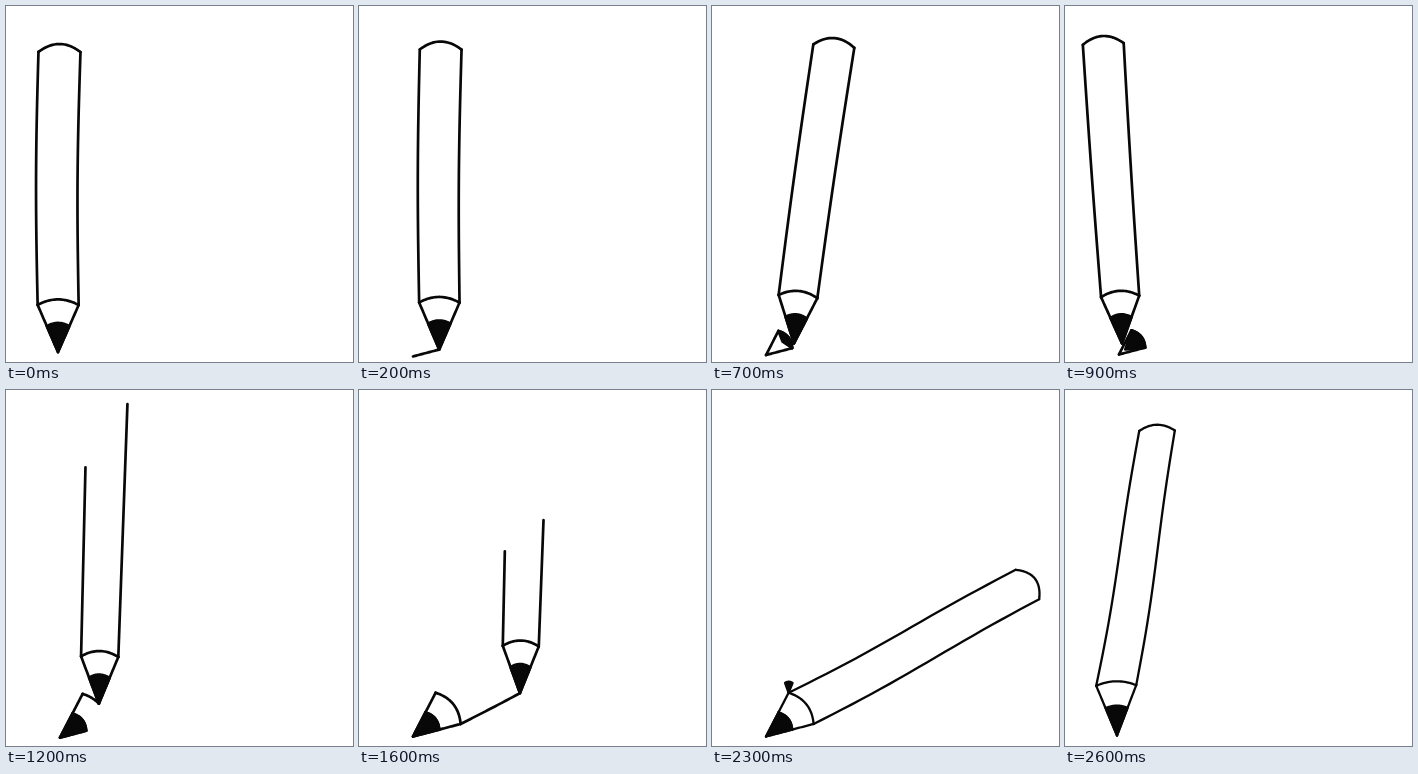
Recreate the animation shown at these times as an HTML page with a canvas. Size 347 by 356 pixels, loop 2.7 s.

```html
<!DOCTYPE html>
<html lang="en">
<head>
<meta charset="utf-8">
<title>Pencil draws pencil</title>
<style>
html, body { margin: 0; width: 100%; height: 100%; overflow: hidden; background: #fff; }
canvas { display: block; }
</style>
</head>
<body>
<canvas id="stage" width="347" height="356"></canvas>
<script>
const ctx = document.getElementById('stage').getContext('2d');
const STEP = 100, STEPS = 27, SPIN = 23, LEAD = 0.55;

// Vector and easing helpers; angles are degrees clockwise from straight up
const clamp = v => Math.max(0, Math.min(1, v));
const ramp = (n, from, to) => clamp((n - from) / (to - from));
const lerp = (a, b, u) => a.map((v, i) => v + (b[i] - v) * u);
const polar = ([x, y], deg, r) => {
  const a = deg * Math.PI / 180;
  return [x + r * Math.sin(a), y - r * Math.cos(a)];
};

// Curves are functions from 0..1 to a point
const line = (a, b) => u => lerp(a, b, u);
const reverse = curve => u => curve(1 - u);

// A chord pushed to its right by offset(u) pixels
function bent(a, b, offset) {
  const dx = b[0] - a[0], dy = b[1] - a[1], len = Math.hypot(dx, dy);
  return u => {
    const [x, y] = lerp(a, b, u), k = offset(u) / len;
    return [x - dy * k, y + dx * k];
  };
}
const arc = (a, b, bulge) => bent(a, b, u => -4 * bulge * u * (1 - u));
const side = (a, b, bow, wave) =>
  bent(a, b, u => bow * Math.sin(Math.PI * u) + wave * Math.sin(2 * Math.PI * u));

const sample = (curve, from = 0, to = 1) =>
  Array.from({ length: 25 }, (_, i) => curve(from + (to - from) * i / 24));

function path(points) {
  ctx.beginPath();
  points.forEach(p => ctx.lineTo(...p));
}

function trace(curve, from = 0, to = 1) {
  if (to - from < 0.001) return;
  path(sample(curve, from, to));
  ctx.stroke();
}

function blob(points) {
  path(points);
  ctx.closePath();
  ctx.fill();
  ctx.stroke();
}

// All outlines of a pencil, from its tip, the angles of cone and body, and its sizes
function pencil({ tip, cone, body, coneLen, bodyLen, half, capHalf, bulge, bow, wave }) {
  const neck = polar(tip, cone, coneLen), end = polar(neck, body, bodyLen);
  const left = polar(neck, cone - 90, half), right = polar(neck, cone + 90, half);
  const capL = polar(end, cone - 90, capHalf), capR = polar(end, cone + 90, capHalf);
  const leadL = lerp(tip, left, LEAD), leadR = lerp(tip, right, LEAD);
  return {
    tip, left, right, leadL, leadR,
    leadArc: arc(leadL, leadR, bulge * 0.4),
    coneArc: arc(left, right, bulge * 0.7),
    cap: arc(capL, capR, bulge),
    sideL: side(left, capL, bow, wave),
    sideR: side(right, capR, bow, wave)
  };
}

// The drawn pencil lies on its side, then swings upright
function drawnPencil(n) {
  const swing = Math.max(0, n - SPIN) / 3;
  const body = 61.3 - 52.2 * swing ** 1.25;
  const drift = 4.5 * (1 - ramp(n, 0, 16));
  return pencil({
    tip: [54 - 2 * swing, 346.5 - swing + drift], cone: body - 10, body,
    coneLen: 45 + 5 * swing, bodyLen: 258, half: 20, capHalf: 18.8 - swing,
    bulge: 9.5 - 3.5 * swing, bow: 1, wave: 1
  });
}

// The drawing pencil stands almost upright and leans while it shades
function drawingPencil(n, tip) {
  const tilt = n < 5 ? 0.3 : n <= 10 ? (tip[0] - 65) * 0.48 : 1.7;
  const slim = ramp(n, 0, 16);
  return pencil({
    tip, cone: tilt * 0.6, body: tilt, coneLen: 47, bodyLen: 253,
    half: 20.5 - 2.5 * slim, capHalf: 21 - slim,
    bulge: 8, bow: -2 * (1 - ramp(n, 0, 12)), wave: 0
  });
}

// Pen strokes in order: first step, last step, curve
const strokesOf = p => [
  [1, 2, line(p.tip, p.leadR)],
  [2, 3, reverse(p.leadArc)],
  [3, 4, line(p.leadL, p.tip)],
  [10, 11, line(p.leadL, p.left)],
  [11.2, 13, p.coneArc],
  [13, 14, line(p.right, p.leadR)],
  [15.3, 18, p.sideR],
  [18, 19, reverse(p.cap)],
  [19, 23, reverse(p.sideL)]
];

function penTip(strokes, n) {
  if (n === 0) return [52, 346];
  if (n >= 5 && n <= 10) {
    const sway = Math.sin((n - 5) * Math.PI / 3);
    return [69.5 + 14.4 * sway, 327 + 12 * Math.abs(sway)];
  }
  const [from, to, curve] = strokes.filter(s => Math.floor(s[0]) <= n).pop();
  return curve(ramp(n, from, to));
}

function drawLead(p, scale = 1) {
  blob([p.tip, ...sample(p.leadArc)].map(q => lerp(p.tip, q, scale)));
}

function drawSketch(p, strokes, n) {
  strokes.forEach(([from, to, curve]) => trace(curve, 0, ramp(n, from, to)));
  const shade = ramp(n, 5, 10) ** 1.5;
  if (n >= 5) blob([...sample(p.leadArc), lerp(p.leadArc(0.5), p.tip, shade)]);
}

// Each line used up on the new pencil is missing from the old one
function drawRest(p, n) {
  trace(p.cap, ramp(n, 9, 11), 1);
  trace(p.sideL, 0, 1 - ramp(n, 9.3, 20));
  trace(p.sideR, 0, 1 - ramp(n, 12, 20));
  trace(p.coneArc, 0, 1 - ramp(n, 20, 21));
  const cone = 1 - ramp(n, 20, 22);
  trace(line(p.tip, p.left), 0, cone);
  trace(line(p.tip, p.right), 0, cone);
  drawLead(p, 1 - 0.62 * ramp(n, 21, 23));
}

function draw(n) {
  ctx.fillStyle = '#fff';
  ctx.fillRect(0, 0, 347, 356);
  ctx.fillStyle = ctx.strokeStyle = '#080808';
  ctx.lineWidth = 2.7 - 0.4 * ramp(n, 16, SPIN);
  ctx.lineCap = ctx.lineJoin = 'round';
  const drawn = drawnPencil(n);
  if (n > SPIN) {
    drawRest(drawn, 0);
    return;
  }
  const strokes = strokesOf(drawn);
  drawSketch(drawn, strokes, n);
  drawRest(drawingPencil(n, penTip(strokes, n)), n);
}

let shown = -1;
function tick() {
  const n = Math.floor(performance.now() / STEP) % STEPS;
  if (n !== shown) draw(shown = n);
  requestAnimationFrame(tick);
}
tick();
</script>
</body>
</html>
```
